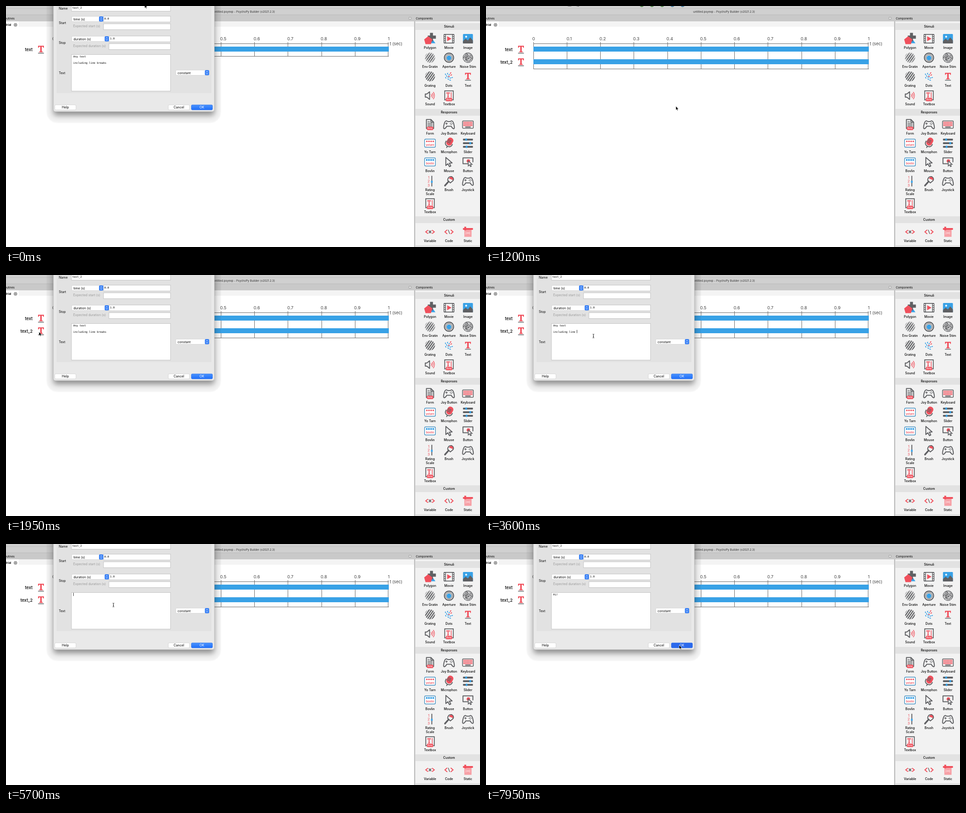
Animation of 1050x534 px, one loop 8000 ms. Source, as an HTML page:

```html
<!DOCTYPE html>
<html lang="en">
<head>
<meta charset="utf-8">
<title>Builder demo</title>
<style>
  html, body { margin: 0; width: 100%; height: 100%; overflow: hidden; background: #fff; }
  svg { display: block; width: 1050px; height: 534px; }
  text { font-family: Inter, "Open Sans", sans-serif; white-space: pre; }
  .mono { font-family: "DejaVu Sans Mono", monospace; font-size: 5.8px; }
  .g { fill: none; stroke: #5f6063; stroke-width: 2; stroke-linejoin: round; stroke-linecap: round; }
  .r { fill: none; stroke: #f0505c; stroke-width: 2; stroke-linecap: round; }
  .b { fill: none; stroke: #38a1e6; stroke-width: 1.8; stroke-linecap: round; }
  .thin { stroke-width: 1.4; }
</style>
</head>
<body>
<svg id="stage" viewBox="0 0 1050 534"></svg>
<script>
const GRAY = '#5f6063', RED = '#f0505c', BLUE = '#38a1e6', INK = '#000', PANEL = '#f2f2f2';
const MONO_W = 3.48, STEP = 150, LOOP = 8000;

const text = (x, y, s, size = 7, fill = INK, anchor = 'start', extra = '') =>
  `<text x="${x}" y="${y}" font-size="${size}" fill="${fill}" text-anchor="${anchor}" ${extra}>${s}</text>`;
const label = (x, y, s) => text(x, y, s, 7, INK, 'middle', 'font-weight="500"');
const mono = (x, y, s, id = '') => `<text class="mono" x="${x}" y="${y}" ${id && `id="${id}"`}>${s}</text>`;
const rect = (x, y, w, h, fill, extra = '') =>
  `<rect x="${x}" y="${y}" width="${w}" height="${h}" fill="${fill}" ${extra}/>`;
const path = (d, cls, extra = '') => `<path d="${d}" class="${cls}" ${extra}/>`;
const shape = (d, fill, extra = '') => `<path d="${d}" fill="${fill}" ${extra}/>`;
const circle = (x, y, r, fill, extra = '') => `<circle cx="${x}" cy="${y}" r="${r}" fill="${fill}" ${extra}/>`;
const at = (x, y, body) => `<g transform="translate(${x} ${y})">${body}</g>`;
const repeat = (n, fn) => Array.from({ length: n }, (_, i) => fn(i)).join('');

let seed = 7;
const random = () => (seed = seed * 16807 % 2147483647) / 2147483647;

// Icons, each centred on its own origin
const serifT = shape('M-6.5-8H6.5V-3.5H4.9L4.3-5.7H1.7V4.3L3.8 4.8V6.4H-3.8V4.8L-1.7 4.3V-5.7H-4.3L-4.9-3.5H-6.5Z', RED)
  + path('M-6 8.5H6', 'g thin');
const badge = rect(-7, 5, 14, 7.5, RED, 'rx="2"') + text(0, 10.7, 'Beta', 5, '#fff', 'middle');
const pad = path('M-6-8C-10-8-12 4-12 7C-12 11-8 10-5 4H5C8 10 12 11 12 7C12 4 10-8 6-8C4-8 4-6.5 2-6.5H-2C-4-6.5-4-8-6-8Z', 'g')
  + path('M-7.5-2H-3.5M-5.5-4V0', 'g thin')
  + circle(5, -4, 1, GRAY) + circle(7.3, -1.8, 1, GRAY) + circle(5, 0, 1, GRAY) + circle(2.8, -1.8, 1, GRAY);
const textbox = rect(-9.5, -10.5, 19, 20, PANEL, `stroke="${GRAY}" stroke-width="1.8"`)
  + shape('M-6-7H2V-4H.8V-5.3H-1V2.5H0V4H-4V2.5H-3V-5.3H-4.8V-4H-6Z', RED)
  + path('M5-7V4', 'r thin') + badge;
const pointer = 'M-7-10V8L-2.5 4L1 10.5L4 9L.8 2.7L7 2.3Z';
const device = (name, lights) => rect(-12, -9, 24, 18, '#fff', 'rx="2.5" stroke="#4690c0" stroke-width="1.4"')
  + lights + text(0, 5.6, name, 6, RED, 'middle', 'font-weight="600"');

const icons = {
  polygon: shape('M4-1L12 10H-2Z', BLUE) + shape('M0-13H6.5V-7H13V0H6.5V6H0V0H-5V-7H0Z', GRAY)
    + shape('M-4-5.5L5 1.5L2 12H-10L-13 1.5Z', RED),
  movie: rect(-12, -10.5, 24, 21, GRAY, 'rx="2"') + rect(-7, -8.7, 14, 17.4, PANEL)
    + repeat(4, i => rect(-10.7, -8.2 + i * 4.5, 2.2, 2.8, PANEL) + rect(8.5, -8.2 + i * 4.5, 2.2, 2.8, PANEL))
    + shape('M-4-5.5L5.5 0L-4 5.5Z', RED),
  image: rect(-11, -10.5, 22, 21, BLUE, 'rx="1.5"') + circle(-4, -4.5, 2.2, '#e8f3fb')
    + shape('M-11 10.5V5L-5 0L0 4L5-3L11 4V10.5Z', GRAY),
  envGrating: circle(0, 0, 11.5, 'url(#stripes)', 'mask="url(#soft)"'),
  aperture: circle(0, 0, 10.2, PANEL, `stroke="${GRAY}" stroke-width="2.2"`)
    + circle(0, 0, 7.4, '#c9cacc', `stroke="${GRAY}" stroke-width="1"`) + circle(0, .5, 5.2, BLUE),
  noise: circle(0, 0, 11, '#a0a0a2', `stroke="${GRAY}" stroke-width="1"`) + repeat(150, () => {
    const a = random() * 6.283, r = 10 * Math.sqrt(random());
    return rect((r * Math.cos(a) - .8).toFixed(1), (r * Math.sin(a) - .8).toFixed(1), 1.6, 1.6, random() < .5 ? GRAY : '#dededf');
  }),
  grating: circle(0, 0, 11, 'url(#stripes)'),
  dots: repeat(13, i => {
    const a = i * 2.4, r = 2.6 * Math.sqrt(i);
    return `<path class="${i % 5 ? 'b' : 'r'}" d="M-1 0H1" transform="translate(${r * Math.cos(a)} ${r * Math.sin(a)}) rotate(${i * 67})"/>`;
  }),
  text: serifT,
  sound: path('M-10.5-3.5H-7L-1-8.5V8.5L-7 3.5H-10.5Z', 'g') + path('M2.5-2.5Q4.5 0 2.5 2.5M5-5Q8.5 0 5 5M7.5-7.5Q12.5 0 7.5 7.5', 'r thin'),
  textbox,
  form: path('M-8-11H2L8-5V9H-8ZM2-11V-5H8', 'g') + path('M-5-6H-1M-5-2.5H5M-5 .5H5M-5 3.5H5', 'g thin') + badge,
  pad,
  keyboard: rect(-12, -8, 24, 16.5, PANEL, `rx="2" stroke="${GRAY}" stroke-width="1.6"`) + repeat(18, i =>
    rect(-10 + i % 6 * 3.45, -6 + (i / 6 | 0) * 3.5, 2.6, 2.6, RED)) + rect(-6, 4.6, 12, 2.2, GRAY),
  lightBox: device('yotarn', repeat(4, i => circle(-7 + i * 4.7, -4, 1.8, RED))),
  keyBox: device('bovlin', repeat(4, i => rect(-9 + i * 4.8, -6.3, 3.6, 3.8, BLUE))),
  microphone: `<g transform="rotate(28)">${rect(-6.5, -13, 13, 18, RED, 'rx="6"')}
    ${path('M-6-4H2M-6-7H2M-6-1H2', 'g thin')}${path('M-8-1Q-8 7.5 0 7.5Q8 7.5 8-1M0 8V11', 'g')}</g>`,
  slider: repeat(3, i => rect(-11, -10 + i * 8, 22, 4, GRAY, 'rx="1"')
    + rect([-6, 3, -5][i], -10.6 + i * 8, 4, 5.2, BLUE, 'rx="1"')),
  mouse: path(pointer, 'g'),
  button: path('M2 4H-11V-9H11V0', 'g') + circle(1, -2, 3.8, RED)
    + at(5, 4, `<path d="${pointer}" transform="scale(.62)" fill="${PANEL}" stroke="${GRAY}" stroke-width="2.6"/>`),
  rating: repeat(3, i => text(-3, -5.3 + i * 8.5, i + 1, 8, RED, 'middle')) + path('M4-11V11', 'g') + rect(2.2, -1, 3.6, 5, BLUE, 'rx="1"'),
  brush: path('M-9 10L-1 1', 'g', 'style="stroke-width:3.4"') + path('M-3-2L3 4L9-1Q12-6 6-10Q-2-11-3-2Z', 'g')
    + shape('M0-5Q2-10 6-9Q11-6 8-2Q5-5 0-5Z', RED),
  variable: path('M-5-3.5L-9.5 0L-5 3.5M5-3.5L9.5 0L5 3.5', 'r') + path('M-2-2.2L2 2.2M2-2.2L-2 2.2', 'g'),
  code: path('M-4.5-4L-9 0L-4.5 4M4.5-4L9 0L4.5 4', 'r') + path('M-1.5-4L1.5 4', 'g thin'),
  isi: rect(-8, -8, 16, 19, '#f7a0a6') + rect(-11, -8.5, 22, 4, RED) + rect(-8, -11.5, 4, 8, RED) + text(0, 4.5, '[xx]', 6, '#fff', 'middle')
};

// Each row: icon centre, label baseline, then [icon, label] pairs
const rows = [
  [72.5, 94.6, ['polygon', 'Polygon'], ['movie', 'Movie'], ['image', 'Image']],
  [114.5, 136.6, ['envGrating', 'Env Gratin'], ['aperture', 'Aperture'], ['noise', 'Noise Stim']],
  [156, 178.6, ['grating', 'Grating'], ['dots', 'Dots'], ['text', 'Text']],
  [198.5, 220.4, ['sound', 'Sound'], ['textbox', 'Textbox']],
  [262.5, 284.5, ['form', 'Form'], ['pad', 'Joy Button'], ['keyboard', 'Keyboard']],
  [304, 326.4, ['lightBox', 'Yo Tarn'], ['microphone', 'Microphon'], ['slider', 'Slider']],
  [345.5, 368.2, ['keyBox', 'Bovlin'], ['mouse', 'Mouse'], ['button', 'Button']],
  [388, 410, ['rating', 'Rating'], ['brush', 'Brush'], ['pad', 'Joystick']],
  [437.5, 458.6, ['textbox', 'Textbox']],
  [500.5, 522.6, ['variable', 'Variable'], ['code', 'Code'], ['isi', 'Static']]
];

const heading = (y, name) => rect(907, y, 143, 15, '#e2e2e2') + label(981.5, y + 10, name);
const panel = rect(904, 20, 146, 514, PANEL) + rect(904, 20, 2.5, 514, '#bebebe') + rect(904, 20, 146, 14, '#c9c9c9')
  + text(908, 29.5, 'Components', 6.2) + heading(38, 'Stimuli') + heading(228, 'Responses') + heading(466, 'Custom')
  + rect(907, 530, 143, 4, '#e2e2e2')
  + rows.map(([y, base, ...items]) => items.map(([icon, name], i) =>
      at(939.3 + i * 42, y, icons[icon]) + label(939.3 + i * 42, base, name)).join('')).join('')
  + label(939.3, 418.6, 'Scale');

const header = rect(0, 0, 1050, 20, '#d0d0d0') + rect(0, 5.5, 1050, .7, '#b8b8b8') + rect(0, 19.5, 1050, .7, '#aaa')
  + shape('M180 0H190L188 1H183ZM199 0H207L205 1.5Z', '#777')
  + repeat(5, i => circle(345 + i * 22.6, -3, 5, i < 3 ? '#4a9a3f' : '#3187bd', 'stroke="#666" stroke-width=".6"'))
  + text(459, 15.3, 'untitled.psyexp - PsychoPy Builder (v2021.2.3)', 6.2, '#333')
  + rect(0, 20, 904, 14, '#c9c9c9') + text(19, 29.5, 'Routines', 6.2, INK, 'end')
  + rect(893, 25, 4, 4.5, '#eee', 'stroke="#888" stroke-width=".7"')
  + rect(0, 34, 904, 12, '#f4f4f4') + rect(0, 34, 28, 12, '#fff')
  + text(11.5, 43.8, 'trial', 6.3, INK, 'end', 'font-weight="600"')
  + circle(21, 41.8, 3.3, '#eee', 'stroke="#444" stroke-width=".9"')
  + path('M19.7 40.5L22.3 43.1M22.3 40.5L19.7 43.1', 'g', 'style="stroke:#333;stroke-width:.9"');

const trackRow = (top, name) => text(59, top + 10, name, 9.4, INK, 'end', 'font-weight="500"')
  + at(77.5, top + 6, serifT) + rect(105, top, 743, 11, BLUE);
const grid = bottom => `<path d="M105 83.5H848M105 ${bottom}H848${repeat(11, i => `M${Math.floor(105 + i * 74.25) + .5 - (i === 10)} 80V${bottom}`)}" stroke="#666" fill="none"/>`;
const timeline = repeat(11, i => text(105.5 + i * 74.25 + (i % 10 ? 4.5 : 0), 75.8, i / 10, 9.5, '#444', 'middle'))
  + text(850, 86.6, 't (sec)', 9.4, '#444')
  + `<g id="oneRow">${grid(111.5)}</g><g id="twoRows">${grid(139.5)}${trackRow(118, 'text_2')}</g>` + trackRow(90, 'text');

const field = (x, y, w, h) => rect(x, y, w, h, '#fff', 'stroke="#b9b9b9" stroke-width=".8"');
const choice = (x, y, w, name) => rect(x, y, w, 11.5, '#fff', 'rx="2.2" stroke="#c4c4c4" stroke-width=".6"')
  + text(x + 4, y + 8.5, name, 7.1) + rect(x + w - 9.5, y, 9.5, 11.5, '#3b82f6', 'rx="2.2"')
  + `<path d="M${x + w - 6.5} ${y + 4.7}l1.8-2 1.8 2M${x + w - 6.5} ${y + 6.9}l1.8 2 1.8-2" fill="none" stroke="#fff" stroke-width=".9"/>`;
const pushButton = (x, w, name, fill, ink, id) =>
  rect(x, 219, w, 11.2, fill, `rx="2.2" stroke="${ink === '#fff' ? '#2b6fe8' : '#c2c2c2'}" stroke-width=".6" id="${id}"`)
  + text(x + w / 2, 227.2, name, 7.2, ink, 'middle');
const dialog = rect(90, -40, 386, 299, '#000', 'rx="24" opacity=".045" filter="url(#haze)"')
  + rect(105, -40, 356.5, 274, '#ececec', 'rx="5" filter="url(#shadow)"')
  + rect(105, -40, 356.5, 274, '#e9e9e9', 'rx="5" stroke="#b5b5b5" stroke-width=".6"') + rect(112, -5, 343, 198, '#e2e2e2')
  + [['Name', 8], ['Start', 40.4], ['Stop', 84.4], ['Text', 150.6]].map(([s, y]) => text(117, y, s, 7.1)).join('')
  + field(145, -5, 219.5, 16.5) + mono(147, 5.8, 'text_2')
  + field(216, 22.5, 148.5, 13) + field(216, 39.5, 148.5, 13) + choice(145.5, 23, 70, 'time (s)')
  + mono(217.8, 30, '0.0') + text(149, 47.2, 'Expected start (s)', 7.1, '#999')
  + field(228, 66.5, 136.5, 13) + field(228, 83.5, 136.5, 13) + choice(145.5, 67, 82.5, 'duration (s)')
  + mono(230.3, 74, '1.0') + text(149, 91.2, 'Expected duration (s)', 7.1, '#999')
  + field(145, 107.5, 219.5, 81) + mono(149, 114, '', 'line0') + mono(149, 127.6, '', 'line2')
  + rect(0, 0, .8, 7, INK, 'id="caret"') + choice(376, 142, 74, 'constant')
  + pushButton(108, 47, 'Help', '#fff', INK, 'help') + pushButton(359.5, 47, 'Cancel', '#fff', INK, 'cancel')
  + pushButton(410.5, 47, 'OK', 'url(#okFill)', '#fff', 'ok');

const $ = id => document.getElementById(id);
$('stage').innerHTML = `<defs>
  <pattern id="stripes" width="4.2" height="4.2" patternUnits="userSpaceOnUse" patternTransform="rotate(35)">${rect(0, 0, 2.4, 4.2, GRAY)}</pattern>
  <radialGradient id="fade"><stop offset=".5" stop-color="#fff"/><stop offset="1" stop-color="#888"/></radialGradient>
  <mask id="soft">${circle(0, 0, 11.5, 'url(#fade)')}</mask>
  <linearGradient id="okFill" x2="0" y2="1"><stop stop-color="#4a92fc"/><stop offset="1" stop-color="#1f6ffa"/></linearGradient>
  <filter id="haze"><feGaussianBlur stdDeviation="1"/></filter>
  <filter id="shadow" x="-20%" y="-20%" width="140%" height="140%"><feDropShadow dx="0" dy="8" stdDeviation="6.5" flood-opacity=".42"/></filter>
</defs>${rect(0, 0, 1050, 534, '#fff')}${header}${timeline}${panel}<g id="dialog">${dialog}</g>
<path id="arrow" d="M0 0V8.5L1.9 6.8L3.2 9.7L4.7 9L3.4 6.2H6Z" fill="#000" stroke="#fff" stroke-width=".6"/>
<path id="beam" d="M-1.8-4Q0-4 0-3Q0-4 1.8-4M0-3V3.4M-1.8 4.4Q0 4.4 0 3.4Q0 4.4 1.8 4.4M-1 .9H1" fill="none" stroke="#111" stroke-width=".9"/>`;

// Pointer path: time in steps, x, y
const trail = [
  [0, 307, -4], [1, 292, 18], [3, 225, 125], [4, 235, 142], [6, 405, 219], [7, 421, 222], [8, 420.5, 222],
  [10, 270, 178], [12, 75, 127], [13, 73, 126], [14, 80, 128], [16, 135, 140], [19, 238, 135], [43, 238, 135],
  [46, 275, 93], [49, 378, 221], [52, 428, 224], [54, 428, 224]
];
function pointerAt(step) {
  const i = Math.max(1, trail.findIndex(p => p[0] >= step));
  const [a, b] = [trail[i - 1], trail[i]], k = (step - a[0]) / (b[0] - a[0]);
  return [a[1] + (b[1] - a[1]) * k, a[2] + (b[2] - a[2]) * k];
}

const FULL = 'Any text\n\nincluding line breaks', TYPED = 'Hi! ';
function contentAt(step) {
  if (step < 21) return FULL;
  if (step <= 38) return FULL.slice(0, Math.max(0, Math.round(30.1 - 1.75 * (step - 21))));
  return TYPED.slice(0, [0, 1, 2][step - 39] ?? 4);
}

function draw(now) {
  const step = Math.floor(now % LOOP / STEP), time = step * STEP;
  const open = step < 8 || step >= 13;
  const show = (id, on) => $(id).setAttribute('visibility', on ? 'visible' : 'hidden');
  show('dialog', open);
  show('oneRow', step < 8);
  show('twoRows', step >= 8);

  const lines = contentAt(step).split('\n'), last = lines.length - 1;
  $('line0').textContent = lines[0];
  $('line2').textContent = lines[2] || '';
  $('caret').setAttribute('x', 149 + lines[last].length * MONO_W);
  $('caret').setAttribute('y', 108.2 + last * 6.75);
  const blinkOn = step < 42 || Math.floor((time - 6300) / 500) % 2 === 0;
  show('caret', open && step >= 20 && blinkOn);
  $('ok').setAttribute('fill', step === 7 || step === 53 ? '#2b69ec' : 'url(#okFill)');

  const [x, y] = pointerAt(step);
  const overText = open && x > 145 && x < 364 && y > 107 && y < 188;
  for (const id of ['arrow', 'beam']) $(id).setAttribute('transform', `translate(${x} ${y})`);
  show('arrow', !overText);
  show('beam', overText);
}
function tick() {
  draw(performance.now());
  requestAnimationFrame(tick);
}
tick();
</script>
</body>
</html>
```
